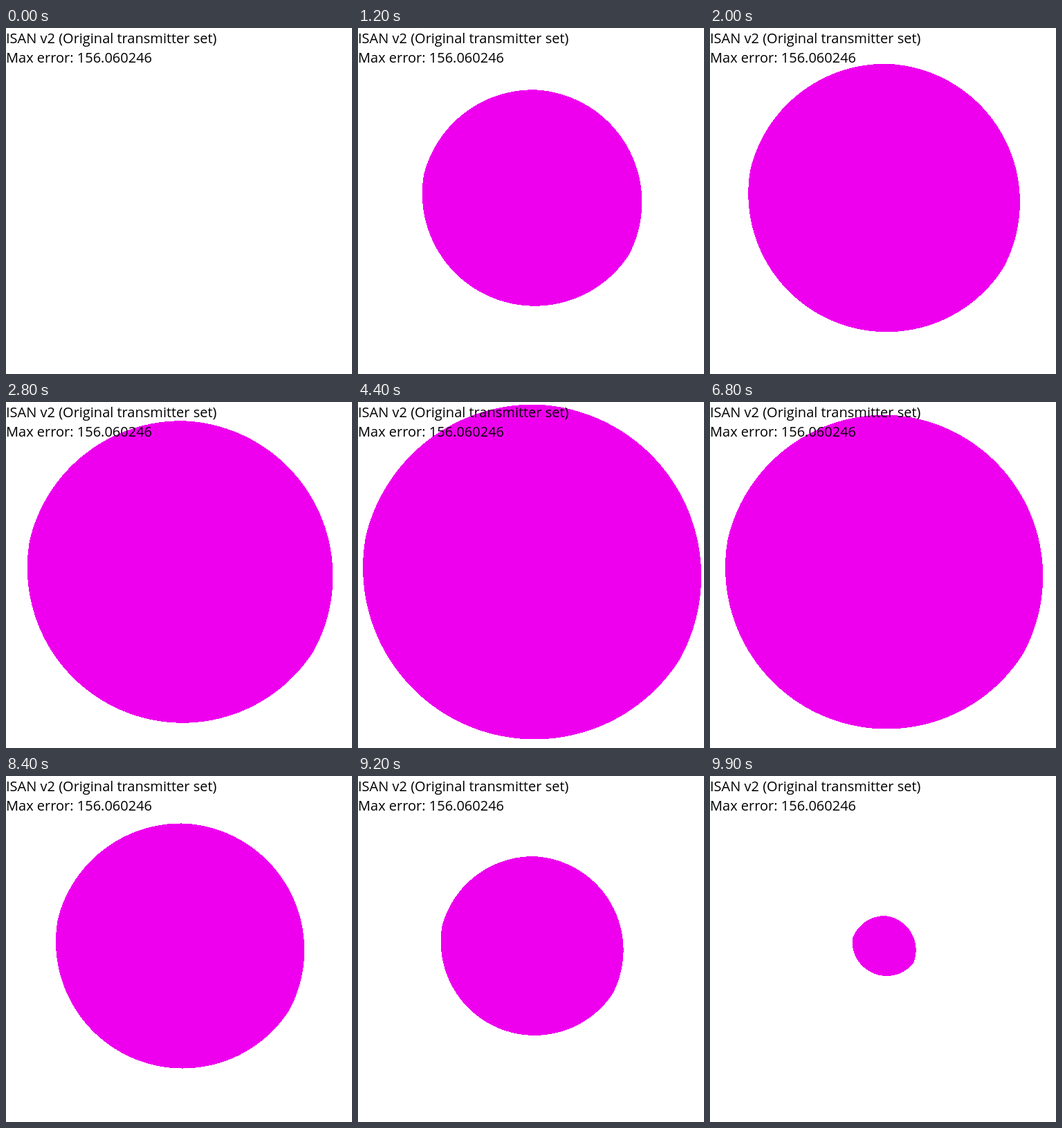
These frames come from a looping animation (500 by 500 pixels, 10000 ms). An HTML page with a canvas:

```html
<!DOCTYPE html>
<html lang="en">
<head>
<meta charset="utf-8">
<title>Transmitter coverage</title>
<style>
  html, body { margin: 0; width: 100%; height: 100%; overflow: hidden; background: #fff; }
  canvas, svg { position: absolute; left: 0; top: 0; display: block; }
  text { font: 20px "Open Sans", sans-serif; fill: #000; }
</style>
</head>
<body>
<canvas id="stage" width="500" height="500"></canvas>
<svg width="500" height="500">
  <text x="0" y="22">ISAN v2 (Original transmitter set)</text>
  <text x="0" y="50">Max error: 156.060246</text>
</svg>
<script>
  const SIZE = 500, RANGE = 250, STEP_MS = 100, STEPS = 100;
  const transmitters = [[247.9, 251.6], [255.3, 239.2], [252.6, 251.8]];
  const ctx = document.getElementById("stage").getContext("2d");
  ctx.fillStyle = "#ee00ee";

  // Horizontal slice through the volume within range of every transmitter.
  function drawSlice(height) {
    const r2 = RANGE * RANGE - height * height;
    ctx.clearRect(0, 0, SIZE, SIZE);
    for (let y = 0; y < SIZE; y++) {
      let left = 0, right = SIZE;
      for (const [cx, cy] of transmitters) {
        const dy = y + 0.5 - cy;
        const half = dy * dy < r2 ? Math.sqrt(r2 - dy * dy) : -SIZE;
        left = Math.max(left, Math.ceil(cx - half - 0.5));
        right = Math.min(right, Math.floor(cx + half + 0.5));
      }
      if (right > left) ctx.fillRect(left, y, right - left, 1);
    }
  }

  const start = performance.now();
  let shown = -1;

  function tick() {
    const elapsed = Math.max(0, performance.now() - start);
    const step = Math.floor(elapsed / STEP_MS) % STEPS;
    if (step !== shown) {
      shown = step;
      drawSlice(step * 2 * RANGE / STEPS - RANGE);
    }
    requestAnimationFrame(tick);
  }
  tick();
</script>
</body>
</html>
```
